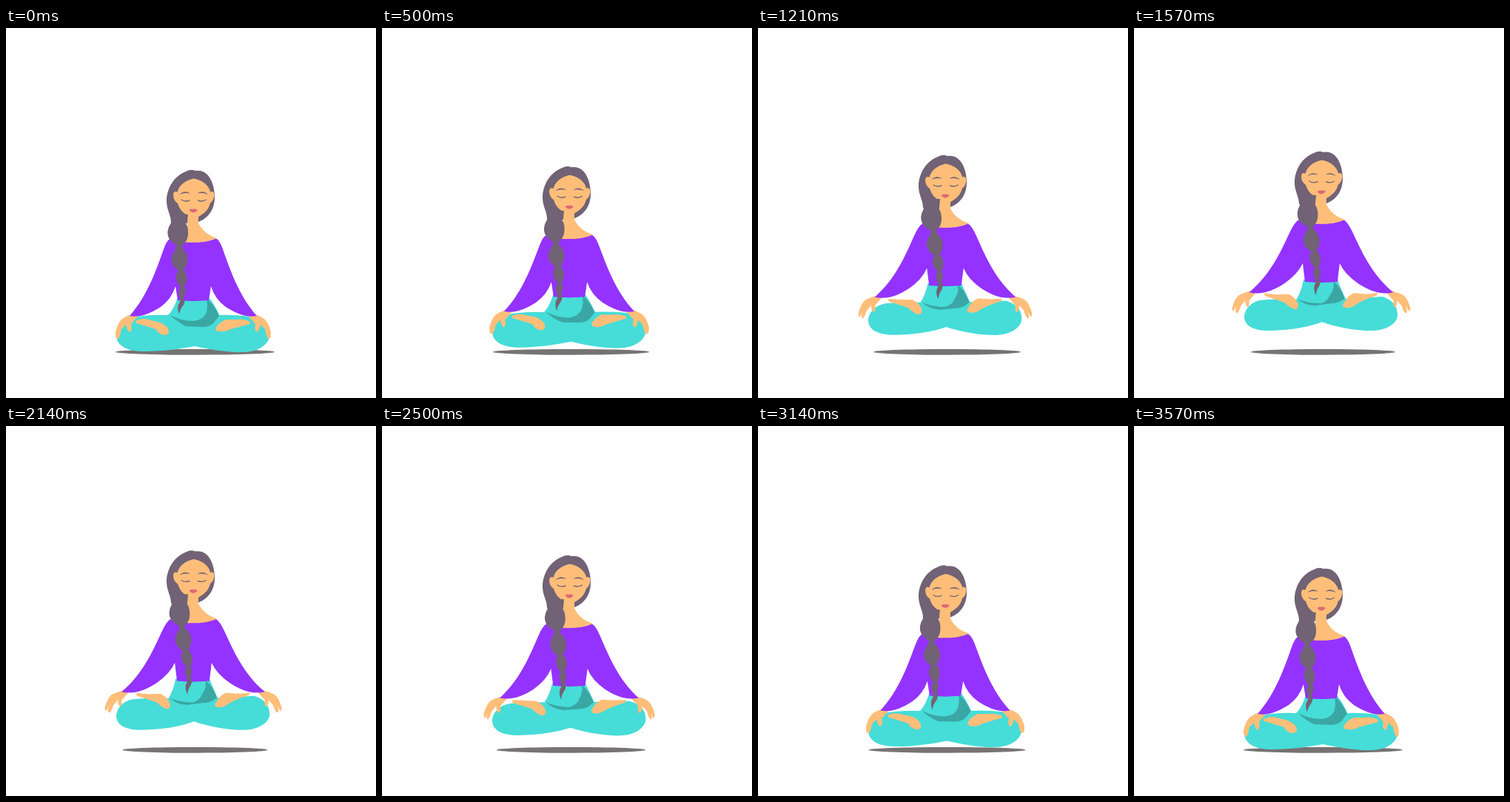
Write an HTML page with a canvas that moves like this. It is 500x500 px and loops after 3.64 s.

```html
<!DOCTYPE html>
<html lang="en">
<head>
<meta charset="utf-8">
<title>Floating meditation</title>
<style>
html, body { margin: 0; width: 100%; height: 100%; overflow: hidden; background: #fefefe; }
canvas { display: block; width: 100vw; height: 100vh; }
</style>
</head>
<body>
<canvas id="stage" width="500" height="500"></canvas>
<script>
const ctx = document.getElementById('stage').getContext('2d');
const LOOP = 3640, STEPS = 51, STEP = LOOP / STEPS;
const HAIR = '#716275', SKIN = '#febe79', SHIRT = '#9433ff', PANTS = '#46dcd8',
      SHADE = '#3aa7a4', LIPS = '#de6873', GROUND = '#767372';

// Each posed part has an outline on the ground and one at full height.
const pelvis = [
  'M232 364 L274 364 Q281 372 289 389 L287 402 L222 402 L219 388 Q227 380 232 364 Z',
  'M229 339 L275 339 Q279 350 286 366 L285 378 L222 378 L220 365 Q226 355 229 339 Z'];
const legs = [
  'M219 388 Q190 387 168 392 C152 397 148 410 149 416 C150 430 164 437 187 437 C215 437 238 433 255 430 C275 434 300 439 322 438 C346 437 357 424 357 412 C357 398 345 392 330 390 Q305 387 288 388 Z',
  'M220 366 Q190 365 170 367 C154 371 149 383 149 390 C150 402 162 408 183 408 C215 407 236 403 254 396 C272 403 300 408 322 408 C346 407 357 395 356 386 C356 374 348 366 336 362 Q310 364 286 365 Z'];
const lapShade = [
  'M271 366 Q280 371 288 389 L281 398 Q276 404 266 404 L243 403 Q231 397 222 388 Q238 396 252 396 Q267 395 271 384 Q273 375 271 366 Z',
  'M269 341 Q278 347 285 365 L281 367 Q275 371 266 371 L246 374 Q232 375 222 366 Q238 372 254 371 Q262 367 264 361 Q272 351 269 341 Z'];
const footLeft = [
  'M175 396 Q184 391 192 394 L208 398 Q218 402 220 409 Q221 415 213 415 Q205 413 203 407 Q190 403 176 399 Z',
  'M176 357 Q186 359 194 359 L209 358 Q219 363 222 372 Q223 378 218 379 Q209 376 204 370 Q191 365 177 361 Z'];
const footRight = [
  'M330 397 Q320 392 312 394 L297 394 Q287 398 283 406 Q283 410 289 410 Q297 411 303 407 Q315 404 330 400 Z',
  'M329 356 Q319 359 311 358 L297 357 Q288 362 287 366 Q279 374 283 376 Q291 379 299 373 Q311 365 328 360 Z'];
const hand = [
  'M170 387 Q162 389 156 394 Q151 399 148 411 Q148 421 151 420 L152 413 Q150 420 152 420 Q154 417 156 407 L162 401 Q164 410 167 411 Q171 409 169 400 L178 390 Z',
  'M158 354 Q148 356 141 360 Q136 364 132 377 Q132 382 134 381 L138 374 Q135 383 138 384 Q141 384 144 374 L150 367 Q150 374 153 376 Q156 375 155 367 L164 357 Z'];
const shirtHalf = [
  'M256 290 Q234 290 222 284.5 Q217 287 213 299 C204 324 192 361 167 389 C182 392 196 385 209 377 Q224 366 229 349 L232 368 Q244 369 256 369 Z',
  'M256 264 Q234 264 222 258.5 Q217 262 211 274 C199 299 185 332 155 356 C172 360 188 354 203 344 Q221 332 228 317 L231 342 Q243 343 256 343 Z'];

const hairBack = 'M256 193 Q250 190 243 194 C227 200 217 217 217 234 C217 246 223 252 223 263 L247 264 L260 262 C276 256 282 242 282 229 C282 209 273 190 256 193 Z';
const neck = 'M246 248 L243 293 Q268 294 285 284 Q268 279 260 264 L260 248 Z';
const face = 'M254 203.5 C267 206 277 214 277 228 C277 243 269 250 262 254 Q254 260 246 254 C239 250 231 243 231 228 C231 214 241 206 254 203.5 Z';
const braid = 'M226 250 Q225 261 220 269 Q216 279 222 287 Q227 292 231 294 Q230 299 226 304 Q221 312 226 321 Q230 326 233 328 Q229 333 230 339 Q232 346 236 350 Q231 356 235 364 Q236 368 235 370 Q230 377 234 387 Q235 380 240 374 Q243 368 240 363 Q245 356 241 349 Q247 341 243 331 Q242 328 240 327 Q247 318 245 309 Q243 302 238 297 Q237 295 238 294 Q245 289 246 280 Q247 270 243 264 L246 252 Z';

function mix([low, high], k) {
  const ends = high.match(/[\d.]+/g);
  let i = 0;
  return low.replace(/[\d.]+/g, n => +n + (ends[i++] - n) * k);
}

function fill(path, color) {
  ctx.fillStyle = color;
  ctx.fill(new Path2D(path));
}

function line(path, color, width) {
  ctx.strokeStyle = color;
  ctx.lineWidth = width;
  ctx.lineCap = 'round';
  ctx.stroke(new Path2D(path));
}

function at(dx, dy, paint) {
  ctx.save();
  ctx.translate(dx, dy);
  paint();
  ctx.restore();
}

// Paints once as given and once mirrored about the vertical line x = axis.
function bothSides(axis, paint) {
  paint();
  at(2 * axis, 0, () => { ctx.scale(-1, 1); paint(); });
}

function drawFace() {
  fill(face, SKIN);
  bothSides(253.7, () => {
    fill('M232 222 Q227 219 226 225 Q226 233 232 237 Z', SKIN);
    fill('M234.5 225 Q241 218.5 249 223.5 Q241 221.8 234.5 225 Z', HAIR);
    line('M237 232 Q242 235.5 248 232.8', HAIR, 1.3);
  });
  fill('M247.5 246 Q251 243.5 253.2 244.8 Q255.5 243.5 259 246 Q253 253 247.5 246 Z', LIPS);
}

function drawShadow(k) {
  ctx.fillStyle = GROUND;
  ctx.beginPath();
  ctx.ellipse(255.5, 437.8, 107.5 - 10.4 * k, 3.9, 0, 0, Math.PI * 2);
  ctx.fill();
}

function draw(k) {
  const rise = -26 * k;
  ctx.fillStyle = '#fefefe';
  ctx.fillRect(0, 0, 500, 500);
  drawShadow(k);

  at(0, rise, () => { fill(hairBack, HAIR); fill(neck, SKIN); });

  fill(mix(pelvis, k), PANTS);
  fill(mix(legs, k), PANTS);
  fill(mix(lapShade, k), SHADE);
  fill(mix(footLeft, k), SKIN);
  fill(mix(footRight, k), SKIN);
  bothSides(253, () => fill(mix(hand, k), SKIN));
  bothSides(253, () => fill(mix(shirtHalf, k), SHIRT));

  at(0, rise, drawFace);
  at(232, 250 + rise, () => {
    ctx.rotate(-0.09 * k);
    ctx.translate(-232, -250);
    fill(braid, HAIR);
  });
}

function tick() {
  const time = performance.now() % LOOP;
  const step = Math.min(STEPS - 1, Math.floor((time + 6) / STEP));
  draw((1 - Math.cos(step / (STEPS - 1) * 2 * Math.PI)) / 2);
  requestAnimationFrame(tick);
}
tick();
</script>
</body>
</html>
```
